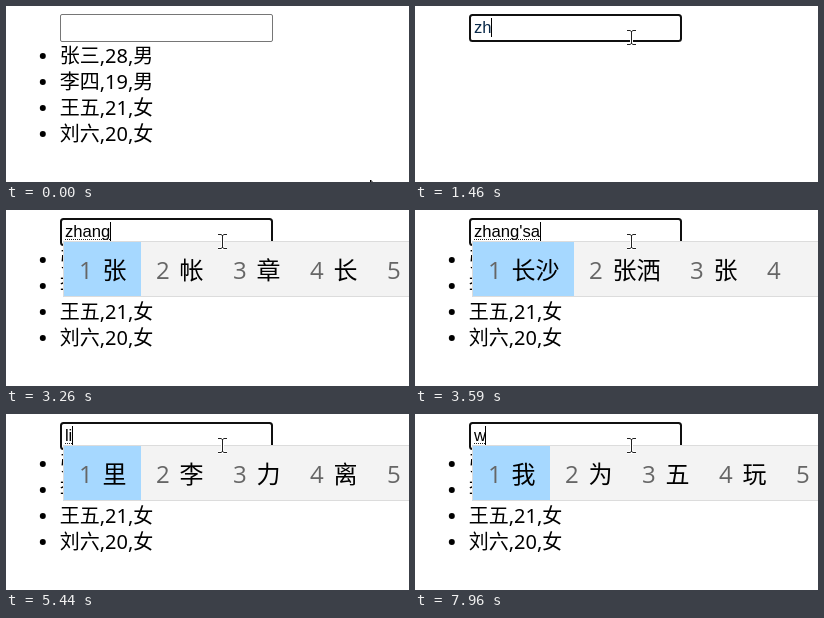
An HTML page for the animation above (8000 ms loop, 403 by 176 pixels).

```html
<!DOCTYPE html>
<html lang="zh-CN">
<head>
<meta charset="utf-8">
<style>
  html, body { margin: 0; width: 100%; height: 100%; overflow: hidden; background: #fff; }
  svg { display: block; width: 403px; height: 176px; }
  text { white-space: pre; }
  #list { font: 20px "Noto Sans", "Noto Sans CJK SC", "Noto Sans CJK", sans-serif; }
  #value { font: 16.67px "Liberation Sans", "Noto Sans CJK SC", "Noto Sans CJK", sans-serif; }
  #popup { font: 24px "Open Sans", "Noto Sans CJK SC", "Noto Sans CJK", sans-serif; }
</style>
</head>
<body>
<svg viewBox="0 0 403 176">
  <rect id="box" fill="#fff"/>
  <text id="value" x="58.9" y="27"></text>
  <path id="under" stroke="#222" stroke-dasharray="1 1"/>
  <path id="caret" stroke="#000"/>
  <g id="list"></g>
  <g id="popup"></g>
  <path id="arrow" d="M0 0V16L3.7 12.6 6.2 18.4 8.6 17.4 6.1 11.7H11Z" fill="#fff" stroke="#000"/>
  <g id="beam" fill="none">
    <path d="M212 24.5h3l1.5 1 1.5-1h3M216.5 25v13M212 38.5h3l1.5-1 1.5 1h3" stroke="#fff" stroke-width="3"/>
    <path d="M212 24.5h3l1.5 1 1.5-1h3M216.5 25v13M212 38.5h3l1.5-1 1.5 1h3" stroke="#222"/>
  </g>
</svg>
<script>
const LOOP = 8000, FOCUS = 800;
const people = ['张三,28,男', '李四,19,男', '王五,21,女', '刘六,20,女'];

// [time, input text, candidates while composing]
const steps = [
  [0, ''],
  [1330, 'z'], [1460, 'zh'], [1600, 'zha'], [1730, 'zhan'],
  [2070, 'zha'], [2200, 'zh'], [2330, 'z'], [2460, ''],
  [2860, 'z', '在 这 中 做'], [2920, 'zh', '这 中 只 着'],
  [3060, 'zha', '炸 扎 咋 眨'], [3190, 'zhan', '站 占 战 沾'],
  [3260, 'zhang', '张 帐 章 长'],
  [3450, "zhang's", '掌声 张氏 丈 张'], [3540, "zhang'sa", '长沙 张洒 张'],
  [3630, "zhang'san", '张三 张散 张'], [3720, '张三'],
  [4840, '张'], [4980, ''],
  [5310, 'l', '了 来 里 老'], [5440, 'li', '里 李 力 离'],
  [6500, '李'], [7490, ''],
  [7960, 'w', '我 为 五 玩']
];
const caretOff = [[0, FOCUS], [4250, 4780], [5900, 6430], [7030, 7490]];

const $ = id => document.getElementById(id);
const set = (id, attrs) => {
  for (const k in attrs) $(id).setAttribute(k, attrs[k]);
};
const show = (id, on) => set(id, { visibility: on ? 'visible' : 'hidden' });
const clamp = v => Math.min(1, Math.max(0, v));

function listMarkup(filter, top) {
  return people.filter(p => p.includes(filter)).map((p, i) => {
    const y = top + 26 * i;
    return `<circle cx="36.8" cy="${y - 7}" r="3"/><text x="53.7" y="${y}">${p}</text>`;
  }).join('');
}

function popupMarkup(cands) {
  let x = 57, out = '<rect x="57" y="31" width="350" height="56" fill="#f3f3f3"/>';
  [...cands.split(' '), ''].forEach((word, i) => {
    const w = 53 + 24 * word.length;
    if (!i) out += `<rect x="57" y="31" width="${w + 1}" height="56" fill="#a6d8ff"/>`;
    out += `<text x="${x + 16}" y="69" fill="#666">${i + 1}</text>` +
      `<text x="${x + 39.5}" y="69">${word}</text>`;
    x += w;
  });
  return out + '<path d="M404 31.5H57.5V86.5H404" fill="none" stroke="#dcdcdc"/>';
}

let shown;
function drawStep(step) {
  if (step === shown) return;
  shown = step;
  const [, text, cands] = step;
  const hanzi = /[一-龥]/.test(text);
  $('value').textContent = text;
  set('value', { fill: text && !cands && !hanzi ? '#0a2a4a' : '#000' });
  const end = text ? 58.9 + $('value').getComputedTextLength() : 59;
  set('caret', { d: `M${Math.floor(end) + .5} 12V31` });
  set('under', { d: cands ? `M59 29.5H${end}` : '' });
  $('list').innerHTML = listMarkup(cands ? '' : text, hanzi ? 55 : 57);
  $('popup').innerHTML = cands ? popupMarkup(cands) : '';
  // the fallback font makes the field one pixel shorter
  drawStep.top = hanzi ? 7 : 8;
  drawStep.height = hanzi ? 27 : 28;
}

function drawBox(focused) {
  const line = focused ? 2 : 1;
  set('box', {
    x: 54 + line / 2, y: drawStep.top + line / 2,
    width: 213 - line, height: drawStep.height - line,
    rx: focused ? 2.5 : 1.5, stroke: focused ? '#101010' : '#767676', 'stroke-width': line
  });
}

function drawPointer(t) {
  const k = clamp(Math.floor((t - 5) / 65) / 5);
  const m = clamp((t - 405) / 195);
  const x = 364.5 - 160 * k + 12 * m, y = 174 - 135 * k - 7 * m;
  set('arrow', { transform: `translate(${x} ${y})` });
  show('arrow', t < 600);
  show('beam', t >= 600);
}

function draw(t) {
  drawStep(steps.findLast(s => s[0] <= t));
  drawBox(t >= FOCUS);
  show('caret', !caretOff.some(([a, b]) => t >= a && t < b));
  drawPointer(t);
}

const start = performance.now();
function tick() {
  draw((performance.now() - start) % LOOP);
  requestAnimationFrame(tick);
}
tick();
</script>
</body>
</html>
```
